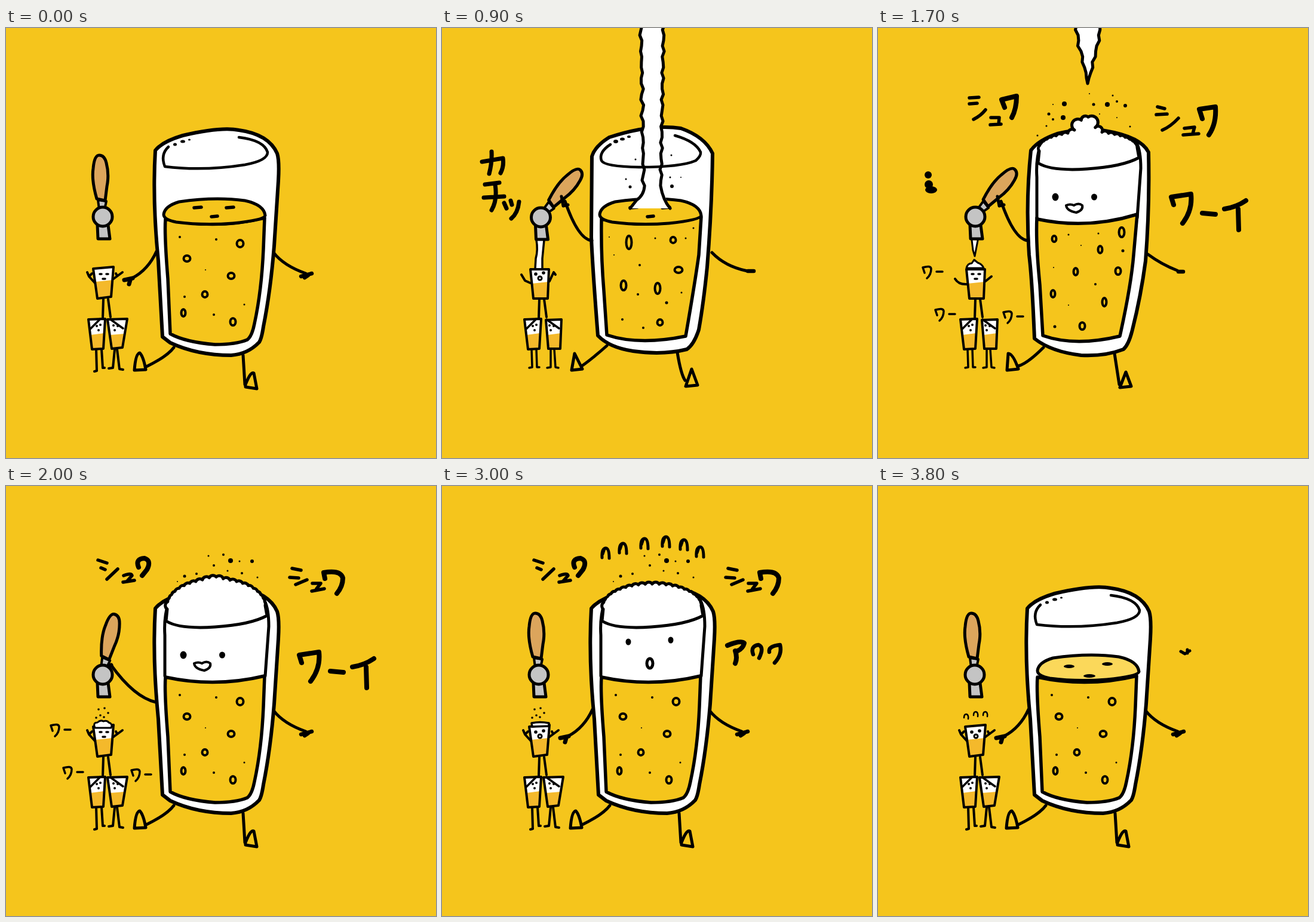
These frames come from a looping animation (720x720 px, 3900 ms). An HTML page:

```html
<!DOCTYPE html>
<html lang="ja">
<head>
<meta charset="utf-8">
<title>Beer</title>
<style>
html, body { margin: 0; width: 100%; height: 100%; overflow: hidden; background: #f5c51c; }
svg { display: block; width: 100%; height: 100%; stroke: #000; stroke-linecap: round; stroke-linejoin: round; }
</style>
</head>
<body>
<svg id="stage" viewBox="0 0 720 720" role="img" aria-label="カチッ シュワ ワーイ アワワ"></svg>
<script>
const STEP = 100, COUNT = 39;
const YELLOW = '#f5c51c', WHITE = '#fff', TAN = '#dca55c', GREY = '#c4c4c4', AMBER = '#f4b92b';
const stage = document.getElementById('stage');

const ink = (d, w = 5, fill = 'none') => `<path d="${d}" stroke-width="${w}" fill="${fill}"/>`;
const dot = (x, y, rx, ry = rx) => `<ellipse cx="${x}" cy="${y}" rx="${rx}" ry="${ry}" stroke="none"/>`;
const ring = (x, y, rx, ry = rx, w = 4, fill = 'none') =>
  `<ellipse cx="${x}" cy="${y}" rx="${rx}" ry="${ry}" stroke-width="${w}" fill="${fill}"/>`;
const move = (x, y, s) => `<g transform="translate(${x} ${y})">${s}</g>`;
const rows = s => s.split(',').map(r => r.trim().split(' ').map(Number));
const within = (i, a, b) => i >= a && i <= b;

// Linear interpolation over rows of [frame, ...values]
function tween(i, keys) {
  const n = keys.findIndex(k => k[0] >= i);
  if (n < 0) return keys[keys.length - 1].slice(1);
  if (n === 0) return keys[0].slice(1);
  const a = keys[n - 1], b = keys[n], u = (i - a[0]) / (b[0] - a[0]);
  return a.slice(1).map((v, j) => v + (b[j + 1] - v) * u);
}

// Four hand-drawn versions of the glass, cycled for the wobble
const ROUND_RIM = 'M282 195Q262 208 267 222Q272 232 330 233Q400 233 425 222Q434 214 433 208Q425 190 390 180';
const ROUND_TICKS = '291 190 4 3,302 186 4 2.5,313 182 3 2';
const LOW_ARM = 'M247 391Q224 404 210 418L205 426';
const glasses = [
  {
    outer: 'M250 205Q262 190 296 180Q360 165 390 171Q440 178 454 210Q458 222 456 256Q453 300 449 365Q443 440 431 500Q428 520 424 526Q405 546 377 548Q320 548 275 527L262 517Q258 440 255 390Q245 290 250 205Z',
    inner: 'M267 320Q265 345 271 420L275 512Q300 526 350 530Q385 530 404 522Q412 516 416 495Q428 440 431 370L433 318',
    rim: 'M272 199Q258 212 266 232Q330 240 400 229Q438 222 438 208Q432 188 390 183',
    ticks: '283 195 3 2.5,296 190 4 2.5,307 187 2 1.5',
    legs: 'M281 535Q270 550 235 567M397 548L400 597',
    feet: 'M215 573Q217 545 224 544Q230 550 234 572ZM401 601L420 604L415 578Q410 574 401 597Z',
    right: 'M448 376Q465 398 502 411', fist: 'M494 416L512 411M500 418L506 414',
    rest: 'M252 374Q238 405 211 419', grip: 'M198 422L212 419M208 422L206 429',
    bubbles: '392 361 6 7,303 386 6 6,377 415 6 6,333 446 5 6,297 477 4 7,380 492 5 7',
    specks: '291 350 2,352 354 2,334 405 1,299 450 2,399 463 1.5,348 480 2',
    spray: '339 117 1.5,364 115 2,376 125 4,391 126 1.5,412 126 3,348 133 2,371 142 1.5,395 146 2,299 151 2.5,319 147 2,287 160 1,421 153 1.5'
  },
  {
    outer: 'M252 212Q256 195 300 175Q360 159 400 168Q440 182 454 210Q457 300 447 380Q443 440 430 492L418 530Q385 548 350 546Q300 543 259 517Q252 440 252 380Q246 290 249 220Z',
    inner: 'M266 320Q264 360 268 420L274 512Q330 532 408 516Q425 430 428 390L435 315',
    rim: ROUND_RIM, ticks: ROUND_TICKS,
    legs: 'M276 532Q255 553 240 563M394 542Q398 580 408 597',
    feet: 'M216 571L234 544L237 573ZM408 602L429 600L425 573Z',
    right: 'M452 376Q475 400 512 407', fist: 'M512 407L522 407',
    rest: LOW_ARM, grip: 'M208 421L203 427',
    bubbles: '294 341 5 7,410 335 6 5,359 358 4 8,307 381 4 8,405 373 6 6,397 425 4 6,295 464 4 8,348 462 4 8,388 498 4 7',
    specks: '287 355 1.5,321 357 1.5,383 344 1,387 375 1.5,347 400 1.5,382 406 2,290 417 1,327 429 1,315 488 1.5',
    spray: '312 127 3,293 128 1,286 144 2.5,310 150 4,354 110 1,361 128 2.5,384 128 4,393 113 1,414 130 3,400 150 1,422 165 1,282 164 1'
  },
  {
    outer: 'M256 205Q268 188 300 177Q350 165 380 172Q440 182 453 208Q455 300 448 390Q440 450 426 505Q420 530 411 538Q380 550 340 548Q290 542 262 520Q258 420 253 380Q247 290 256 205Z',
    inner: 'M266 318Q264 360 271 430L276 515Q330 534 405 516Q424 430 428 380L434 312',
    rim: ROUND_RIM, ticks: ROUND_TICKS,
    legs: 'M277 535Q250 562 235 566M396 545L404 597',
    feet: 'M216 573L218 545Q226 545 235 571ZM405 602L424 600L415 576Z',
    right: 'M452 379Q475 396 501 406', fist: 'M503 408L511 408',
    rest: LOW_ARM, grip: 'M208 421L203 427',
    bubbles: '295 353 4 6,408 342 5 9,372 371 4 7,331 408 4 7,402 407 5 7,293 445 4 7,379 459 4 8,342 499 5 7',
    specks: '319 346 1.5,369 344 1.5,340 364 1,410 373 2.5,294 401 1,364 429 2,319 464 1,296 500 2.5',
    spray: '312 127 4,293 128 1,286 144 2.5,310 150 4,293 153 2,354 110 1,361 128 2.5,384 128 4,393 113 1.5,400 123 2,414 130 3,371 144 1,400 150 1,422 165 1.5,267 180 1.5,282 164 1.5'
  },
  {
    outer: 'M251 215Q256 198 280 183Q350 160 400 168Q440 182 453 210Q452 300 444 400Q438 460 430 505Q422 530 410 538Q370 548 320 541Q280 535 261 515Q252 400 250 350Z',
    inner: 'M267 320Q266 380 271 440L276 514Q330 532 408 516Q423 430 430 380L434 316',
    rim: ROUND_RIM, ticks: ROUND_TICKS,
    legs: 'M276 532Q250 555 234 566M394 543Q400 580 407 590',
    feet: 'M217 573L222 545L235 571ZM408 600L428 598L418 571Z',
    right: 'M452 376Q475 400 512 407', fist: 'M512 407L522 407',
    rest: LOW_ARM, grip: 'M208 421L203 427',
    bubbles: '313 359 5 12,387 355 5 6,396 405 7 6,304 431 5 9,361 436 5 10,365 493 5 6',
    specks: '280 350 1,357 352 1.5,408 352 1.5,421 335 1.5,288 380 1,331 397 2,328 446 2,401 443 1.5,376 460 2.5,302 488 2,337 502 2',
    spray: '312 104 2,331 108 1.5,358 116 4.5,381 116 2,334 129 3,282 149 5,311 141 1.5,327 144 1,369 135 1.5,386 147 3,402 136 1,409 157 1'
  }
];
const ORDER = [0, 1, 2, 1, 3];

const fizz = [
  'M154 124L169 129M159 137L166 140M169 156L187 139M197 150Q210 145 211 150L203 159M196 161L215 158',
  'M222 136Q216 122 232 121Q244 125 236 140L228 150',
  'M479 138L494 141M475 153L490 154M485 165L504 157M513 163L527 163L520 172M512 176L533 172',
  'M534 155L532 145Q560 140 564 154Q564 168 554 180'
];
const fizzSharp = [
  'M153 117L169 116M153 127L166 126M160 153Q172 147 180 137M189 150L203 150L202 161M188 162L206 161',
  'M212 133L207 120L232 114Q232 135 224 150',
  'M468 132L480 135M466 145L484 144M476 171Q490 165 503 151M513 168L530 166L527 177M511 179L537 177',
  'M543 152L538 136L565 132Q567 160 554 179'
];
const CLICK = 'M67 224L102 218Q104 232 98 243M83 207Q84 225 79 244M72 262L96 259M70 284L104 282M89 262Q93 288 83 305M104 293L108 302M115 289L117 296M129 291Q127 310 116 319';
const CHEER = 'M495 296L491 283L524 278Q527 305 510 327M543 310L565 312M616 289Q600 300 580 303M603 303L604 338';
const PANIC = 'M478 267Q500 258 506 263Q504 272 495 276M491 276Q495 288 491 297';
const PANIC_TAIL = 'M521 282Q516 268 530 266Q540 270 531 288M548 278Q546 268 566 266Q570 282 557 296';

function lettering(i, sharp) {
  let s = '';
  if (within(i, 13, 36)) {
    const t = sharp ? fizzSharp : fizz;
    s += ink(t[0], 5.5) + ink(t[1], 8) + ink(t[2], 5.5) + ink(t[3], 8);
  }
  if (within(i, 9, 15)) s += ink(CLICK, 7);
  if (i === 8 || within(i, 16, 17)) s += dot(84, 246, 6) + dot(85, 262, 7) + dot(89, 271, 10, 6);
  if (within(i, 14, 20)) s += ink(CHEER, 8);
  if (i === 13 || i === 21)
    s += ink('M532 261Q545 256 546 268L530 280M545 275Q535 290 545 291L552 300L541 300L552 311M547 327l2 2', 6);
  if (within(i, 29, 36)) s += ink(PANIC, 8) + ink(PANIC_TAIL, 6.5);
  if (i === 28 || i > 36) s += ink('M507 277L514 281L522 276M518 274v6', 5);
  if (within(i, 15, 20))
    for (const [x, y] of [[0, 0], [21, 71], [135, 75]])
      s += move(x, y, ink('M78 410L75 401Q88 397 89 403Q89 413 82 419M98 408h10', 3.5));
  if (within(i, 28, 35))
    for (const [x, y] of rows('274 112,303 104,339 96,375 93,405 98,432 110'))
      s += move(x, y - (i - 30) * 4, ink('M-6 8Q-7 -7 0 -8Q6 -8 6 9M-5 2L-2 -7', 5));
  return s;
}

// Column of foam down to y = tip; pointed unless it reaches the surface
function pour(i, tip, landed) {
  const left = [], right = [];
  for (let y = -6; y < tip; y += 9) {
    const k = landed ? 1 - .22 * Math.min(1, y / 235) : Math.min(1, (tip - y) / 80);
    const w = 19 * k, j = 1.8 * Math.sin(y * .23 + i) + Math.sin(y * .51 + i * 2);
    left.push(`${(352 - w + j).toFixed(1)} ${y}`);
    right.unshift(`${(352 + w + 1.8 * Math.sin(y * .27 - i)).toFixed(1)} ${y}`);
  }
  const a = left.join('L'), b = right.join('L');
  if (!landed) return ink(`M${a}L351 ${tip}L${b}`, 5, WHITE);
  const f = tip + 32;
  return `<path d="M${a}L315 ${f}L382 ${f}L${b}" fill="${WHITE}" stroke="none"/>` +
    ink(`M${a}Q338 ${tip + 10} 326 ${tip + 18}L315 ${f}M382 ${f}Q370 ${tip + 18} ${b}`, 5);
}

function dome(height, peak) {
  let d = 'M268 226L270 206';
  for (let k = 1; k <= 22; k++) {
    const a = Math.PI * (1 - k / 22), x = 352 + 82 * Math.cos(a);
    const y = 200 - height * Math.sin(a) - peak * Math.exp(-(((x - 348) / 14) ** 2));
    d += `A7 7 0 0 1 ${x.toFixed(1)} ${y.toFixed(1)}`;
  }
  return ink(d + 'L437 217Q410 232 350 236Q290 240 268 226Z', 5, WHITE);
}

function face(i) {
  if (i < 22) return dot(297, 283, 5.5, 6.5) + dot(362, 283, 5, 5.5) +
    ink('M315 297Q322 294 328 297Q336 292 342 297Q344 305 332 309Q316 306 315 297Z', 4, WHITE);
  if (i < 28) return dot(311, 282, 4.5, 6) + dot(385, 283, 5) + ink('M336 307L349 306', 5);
  return dot(312, 261, 4.5, 5.5) + dot(383, 258, 4.5, 5.5) + ring(348, 297, 5, 8, 5);
}

function surface(i) {
  const fill = i === 38 ? '#fbd85a' : within(i, 10, 37) ? WHITE : YELLOW;
  let s = ink('M264 312Q266 298 290 291Q350 282 400 289Q432 296 434 314Q432 322 380 327Q330 331 285 325Q264 321 264 312Z', 5, fill);
  if (within(i, 10, 16)) s += dot(289, 300, 5, 3) + dot(327, 306, 6, 3) + ring(300, 312, 8, 4);
  else if (i > 33) s += dot(317, 305, 9, 3) + dot(381, 301, 9, 3) + dot(351, 321, 10, 3);
  else s += ink('M315 301L327 300M369 301L381 300M344 316L354 315', 5.5);
  return s;
}

function bigGlass(i, g) {
  const full = within(i, 17, 33);
  let s = ink(g.legs) + ink(g.feet, 5, YELLOW) + ink(g.right, 5) + ink(g.fist, 6.5);
  s += ink(g.outer, 6, WHITE) + ink(g.inner + 'Q350 338 267 320', 5.5, YELLOW);
  for (const b of rows(g.bubbles)) s += ring(b[0], b[1], b[2] - .5, b[3] - 1, 4);
  for (const p of rows(g.specks)) s += dot(...p);
  if (full) {
    const [h, peak] = tween(i, [[17, 26, 27], [20, 44, 4], [22, 50, 0], [25, 50, 0], [30, 36, 0], [33, 15, 0]]);
    s += ink('M272 195Q264 220 266 250L266 318M433 192Q440 206 440 235L434 318', 5);
    s += dome(h, peak) + face(i);
    for (const p of rows(g.spray)) s += dot(...p);
  } else {
    const [up] = tween(i, [[13, 0], [14, 25], [16, 78], [34, 65], [37, 3]]);
    if (up > 5) s += ink(`M265 ${312 - up}L266 318M434 ${312 - up}L434 318`);
    s += move(i === 38 ? 3 : 0, -up, surface(i));
    if (within(i, 9, 15)) {
      s += pour(i, 270 - up, true);
      for (const p of rows('308 253 1.5,315 266 2.5,382 250 1.5,385 265 3,400 250 1,384 213 1.5,324 220 1.5')) s += dot(...p);
    }
    s += ink(g.rim, 4.5);
    for (const p of rows(g.ticks)) s += dot(...p);
  }
  const tips = { 8: 165, 16: 180, 17: 93, 18: 30 };
  return s + (tips[i] ? pour(i, tips[i], false) : '');
}

function leftArm(i, g) {
  if (i < 2 || i > 22) return ink(g.rest) + ink(g.grip, 7);
  const [y, cx, cy, x, hy] = tween(i, [
    [1, 374, 238, 405, 207, 421], [5, 371, 215, 362, 186, 379], [7, 360, 205, 345, 174, 276],
    [9, 356, 228, 354, 206, 290], [18, 356, 228, 354, 206, 290], [20, 362, 215, 354, 176, 300],
    [23, 385, 232, 400, 207, 423]]);
  const hold = within(i, 8, 18);
  return ink(`M251 ${y}Q${cx} ${cy} ${x} ${hy}`) +
    (hold ? ink('M200 282L203 298L211 296', 5) : ink(`M${x} ${hy}l-4 2`, 7));
}

function tap(i, base) {
  const [r] = tween(i, [[7, 0], [9, 43], [18, 43], [21, 0]]);
  const s = ink('M153 330L154 353L174 353L171 330Z', 5, GREY) +
    `<g transform="rotate(${r} 162 316)">` + ink('M154 288L168 290L165 304L156 304Z', 4, GREY) +
    ink('M152 286Q143 255 146 235Q148 213 156 213Q165 213 168 226Q173 245 169 265L166 289Z', 5, TAN) + '</g>' +
    ring(162, 316, 16, 16, 5, GREY);
  return move(base === 3 ? 3.5 : base ? 1 : 0, base === 3 ? 1 : 0, s);
}

const cup = (outline, beer) =>
  `<path d="${outline}" fill="${WHITE}" stroke="none"/><path d="${beer}" fill="${AMBER}" stroke="none"/>` + ink(outline, 4);

function tower(i, base) {
  let s = '';
  if (within(i, 9, 16)) s += `<path d="M158 354Q160 375 156 404L167 404Q166 380 172 354Z" fill="${WHITE}" stroke="none"/>` +
    ink('M158 355Q161 372 157 386L156 403M171 355Q169 375 168 386L168 403', 3.5);
  if (i === 17) s += ink('M157 355L159 372L162 382L167 356', 3, WHITE);
  const arms = [
    'M149 427L139 416L136 409M139 416l5 -5M180 420L195 409M186 415l-2 -4', 'M147 426L134 414M180 424L189 409',
    'M149 429Q135 430 129 420M180 424L190 416', 'M148 427L139 423L133 413M180 424L187 409M187 409l3 4'];
  s += ink(arms[base], 4) + ink('M163 454L162 486M171 454L175 484', 4);
  s += base ? cup('M148 404L179 404L177 453L153 453Z', 'M150 428L178 425L177 453L153 453Z')
    : cup('M146 403L180 400L176 450L153 453Z', 'M149 425L178 422L176 450L153 453Z');
  if (within(i, 9, 15) || i > 27)
    s += dot(157, 412, 2.8) + dot(170, 410, 2.8) + ring(164, 419, 3, 3, 3);
  else s += ink('M157 412h3M168 412h3M162 420h4', 3.5);
  if (within(i, 16, 19)) s += ink('M148 402Q150 394 157 394L161 388L167 393Q174 395 177 402Z', 3, WHITE);
  if (within(i, 20, 27)) s += ink('M149 405Q145 396 153 396Q158 391 163 394Q169 392 172 396Q179 398 176 405Z', 3, WHITE);
  if (within(i, 28, 33)) s += ink('M151 403L150 397Q164 394 179 397L179 402Z', 3.5, WHITE);
  if (within(i, 20, 33))
    for (const [x, y] of rows('155 374,165 372,158 384,171 380,151 388,164 387')) s += dot(x + (i % 2 ? 2 : 0), y, 1.8);
  if (i > 33)
    for (const [x, y] of rows('147 385,163 381,179 381')) s += move(x, y + (38 - i), ink('M-3 3Q-3 -3 1 -3Q5 -2 4 5', 2.5));
  s += cup('M138 488L166 487L163 537L144 538Z', 'M141 514L164 511L163 537L144 538Z');
  s += base ? cup('M174 489L200 488L198 537L178 537Z', 'M176 514L199 511L198 537L178 537Z')
    : cup('M170 488L203 487L195 535L177 537Z', 'M174 514L198 512L195 535L177 537Z');
  s += ink('M141 504L158 487M175 488L196 503', 3.5);
  for (const [x, y] of rows('152 499,158 497,155 506,180 498,187 499,182 506')) s += dot(x, y, 2);
  return s + (base
    ? ink('M150 538L151 568L146 569M158 538L159 568L163 568M182 538L182 568L176 569M188 538L190 568L195 569', 3.5)
    : ink('M151 538L152 574L148 575M160 538L162 569L165 569M182 538L179 569L172 570M186 538L190 571L196 572', 4));
}

function draw(i) {
  const base = i === 38 ? 0 : ORDER[i % 5], g = glasses[base];
  stage.innerHTML = tower(i, base) + bigGlass(i, g) + tap(i, base) + leftArm(i, g) + lettering(i, base > 1);
}

const start = performance.now();
let shown = -1;
function tick() {
  const i = Math.floor((performance.now() - start) / STEP) % COUNT;
  if (i !== shown) draw(shown = i);
  requestAnimationFrame(tick);
}
tick();
</script>
</body>
</html>
```
